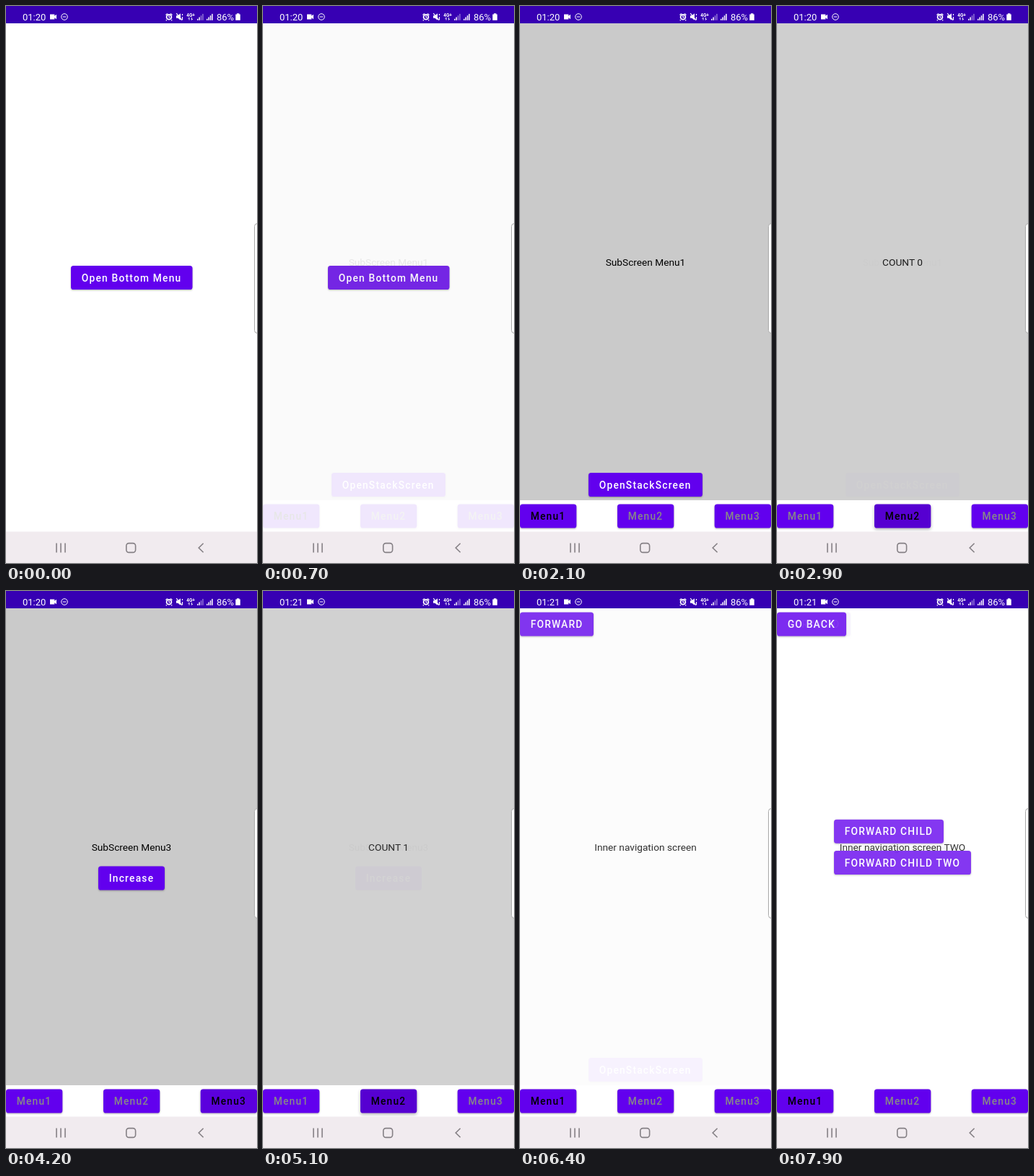
Animation, 348 px wide and 772 px high, one loop 8 s. Source, as an HTML page:

```html
<!DOCTYPE html>
<html lang="en">
<head>
<meta charset="utf-8">
<title>Bottom menu navigation</title>
<style>
  html, body { margin: 0; width: 100%; height: 100%; overflow: hidden; background: #fff; }
  svg { display: block; width: 100vw; height: 100vh; }
  text { font-family: Roboto, "Noto Sans", sans-serif; font-size: 13.7px; }
  .label { font-size: 13.75px; font-weight: 500; letter-spacing: .0893em; }
  .body { text-anchor: middle; }
  .status { font-size: 13px; fill: #fff; }
</style>
</head>
<body>
<svg id="stage" viewBox="0 0 348 772" preserveAspectRatio="none">
  <rect width="348" height="772" fill="#fff"/>
  <g id="home"></g>
  <g id="main">
    <g id="pages"></g>
    <rect y="685" width="348" height="44" fill="#fff"/>
    <g id="tabs"></g>
  </g>

  <rect x="344.5" y="301.5" width="12" height="152" rx="4" fill="#fff" stroke="#a8a8a8"/>

  <g id="status-bar">
    <rect width="348" height="24" fill="#3700b3"/>
    <text id="clock" class="status" x="23" y="19.6"></text>
    <path d="M61 11.5h6.3v2.3l2.7-2v6.4l-2.7-2v2.3H61z" fill="#fff"/>
    <g fill="none" stroke="#fff">
      <circle cx="81" cy="15" r="4.3"/>
      <path d="M78.7 15h4.6"/>
      <path d="M221.5 12.5l2.5-2M230.5 12.5l-2.5-2M222.8 19.2l-1 1M229.2 19.2l1 1" stroke-width="1.3"/>
      <circle cx="226" cy="15.2" r="3.4" stroke-width="1.8"/>
      <path d="M226 13v2.4l1.5 .8M236.2 10.2l8 9.6M244.5 11v2M244.5 15v4" stroke-width="1.2"/>
    </g>
    <path d="M236 13.2h2.4l3.6-3v9.6l-3.6-3H236z" fill="#fff"/>
    <text x="250.3" y="14.8" fill="#fff" style="font-size:6.4px;font-weight:700">4G+</text>
    <path d="M254 19.5v-3.4l-1.3 1.4M257.5 16v3.4l1.3-1.4" fill="none" stroke="#fff" stroke-width=".9"/>
    <g id="signal" fill="#fff"></g>
    <text class="status" x="292" y="19.6">86%</text>
    <path d="M320 10.3h3.4v1.2h1.4v8.3h-6.5v-8.3h1.7z" fill="#fff"/>
  </g>

  <rect y="728.5" width="348" height="43.5" fill="#f1ebef"/>
  <g fill="none" stroke="#858085" stroke-width="1.6">
    <path d="M70 744.5v13M76 744.5v13M82 744.5v13"/>
    <rect x="166.8" y="744.6" width="12.8" height="12.8" rx="3.6"/>
    <path d="M273.6 744.8l-6.4 6.2 6.4 6.2"/>
  </g>
</svg>
<script>
const LOOP = 8000, FADE = 300;
const GREY = '#cacaca', PURPLE = '#6200ee';
const byId = id => document.getElementById(id);
const clamp = v => Math.max(0, Math.min(1, v));

function add(parent, tag, attrs, text) {
  const el = document.createElementNS('http://www.w3.org/2000/svg', tag);
  for (const key in attrs) el.setAttribute(key, attrs[key]);
  if (text) el.textContent = text;
  parent.append(el);
  return el;
}

// Each press is [start, hold] in ms
const buttons = [];
function button(parent, x, y, w, text, ...presses) {
  const g = add(parent, 'g', {});
  const box = { x, y, width: w, height: 33, rx: 3.6 };
  const id = 'clip' + buttons.length;
  add(add(g, 'clipPath', { id }), 'rect', box);
  const face = add(g, 'rect', { ...box, fill: PURPLE });
  const ripple = add(g, 'circle', { cx: x + w / 2, cy: y + 16.5, 'clip-path': `url(#${id})` });
  const label = add(g, 'text', { class: 'label', x: x + 14.7, y: y + 21.5, fill: '#fff' }, text);
  buttons.push({ face, ripple, label, w, presses });
  return label;
}

function page(color) {
  const g = add(byId('pages'), 'g', {});
  add(g, 'rect', { y: 24, width: 348, height: 661, fill: color });
  return g;
}
const caption = (g, text) => add(g, 'text', { class: 'body', x: 174, y: 360 }, text);

function menuOne(...press) {
  const g = page(GREY);
  caption(g, 'SubScreen Menu1');
  button(g, 95, 647, 158, 'OpenStackScreen', ...press);
  return g;
}
function menuTwo(count) {
  const g = page(GREY);
  caption(g, 'COUNT ' + count);
  return g;
}
function menuThree() {
  const g = page(GREY);
  caption(g, 'SubScreen Menu3');
  button(g, 128, 381.5, 92, 'Increase', [4260, 120]);
  return g;
}
function innerOne() {
  const g = page('#fff');
  caption(g, 'Inner navigation screen');
  button(g, 0, 29.5, 102, 'FORWARD', [7600, 200]);
  return g;
}
function innerTwo() {
  const g = page('#fff');
  caption(g, 'Inner navigation screen TWO');
  button(g, 0, 29.5, 96, 'GO BACK');
  button(g, 79, 316.8, 152, 'FORWARD CHILD');
  button(g, 79, 360, 190, 'FORWARD CHILD TWO');
  return g;
}

const MAIN_AT = 650;
button(byId('home'), 90, 360, 168.5, 'Open Bottom Menu', [400, 200]);

const route = [
  { at: -FADE, tab: 0, g: menuOne() },
  { at: 2720, tab: 1, g: menuTwo(0) },
  { at: 3740, tab: 2, g: menuThree() },
  { at: 4940, tab: 1, g: menuTwo(1) },
  { at: 5560, tab: 0, g: menuOne([6090, 180]) },
  { at: 6250, tab: 0, g: innerOne() },
  { at: 7750, tab: 0, g: innerTwo() }
];

const tabs = [
  button(byId('tabs'), 0, 690.5, 78.3, 'Menu1', [5500, 250]),
  button(byId('tabs'), 135, 690.5, 78.3, 'Menu2', [2680, 260], [4890, 250]),
  button(byId('tabs'), 269.7, 690.5, 78.3, 'Menu3', [3690, 450])
];

for (const x of [265, 278])
  for (let i = 0; i < 4; i++)
    add(byId('signal'), 'rect', {
      x: x + i * 2.4, y: 17.8 - i * 2.3, width: 1.5, height: 2 + i * 2.3,
      opacity: x === 265 && i > 1 ? .45 : 1
    });

// cubic-bezier(.4, 0, .2, 1)
function ease(x) {
  if (x <= 0 || x >= 1) return clamp(x);
  let lo = 0, hi = 1, u;
  for (let i = 0; i < 20; i++) {
    u = (lo + hi) / 2;
    const bx = 1.2 * u * (1 - u) ** 2 + .6 * u * u * (1 - u) + u ** 3;
    if (bx < x) lo = u; else hi = u;
  }
  return 3 * u * u * (1 - u) + u ** 3;
}
const enter = (t, at) => ease((t - at) / FADE);

function fadeTo(g, alpha) {
  g.setAttribute('opacity', alpha);
  g.style.display = alpha > 0 ? '' : 'none';
}

function drawButton({ face, ripple, w, presses }, t) {
  let force = 0, grow = 0;
  for (const [start, hold] of presses) {
    const age = t - start;
    const f = clamp(age / 75) * (1 - clamp((age - hold) / 150));
    if (f > 0) { force = f; grow = ease(age / 225); }
  }
  ripple.setAttribute('r', w * (.18 + .36 * grow));
  ripple.setAttribute('opacity', .12 * force);
  const lift = 1 + 1.6 * force;
  face.style.filter = `drop-shadow(0 ${lift}px ${lift * .8}px rgba(0,0,0,.3))`;
}

function draw(t) {
  const shown = enter(t, MAIN_AT);
  fadeTo(byId('home'), 1 - shown);
  fadeTo(byId('main'), shown);

  let current = 0;
  route.forEach(({ at, tab, g }, i) => {
    const next = route[i + 1];
    fadeTo(g, enter(t, at) * (next ? 1 - enter(t, next.at) : 1));
    if (t >= at) current = tab;
  });
  tabs.forEach((label, i) => label.setAttribute('fill', i === current ? '#000' : '#888'));
  buttons.forEach(b => drawButton(b, t));
  byId('clock').textContent = t < 5000 ? '01:20' : '01:21';
}

const began = performance.now();
function tick() {
  draw((performance.now() - began) % LOOP);
  requestAnimationFrame(tick);
}
tick();
</script>
</body>
</html>
```
